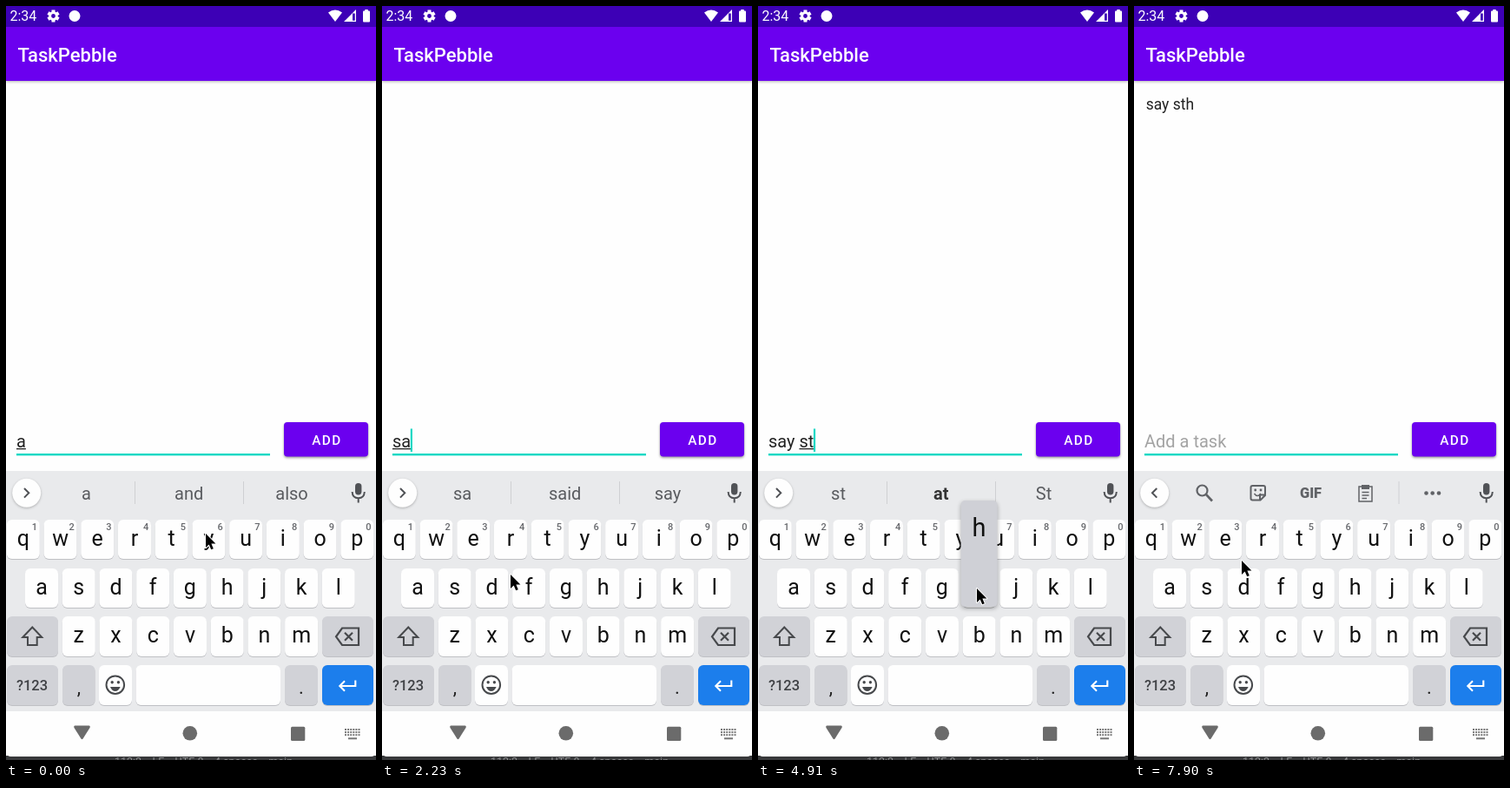
Write an HTML page with a canvas that moves like this. It is 426 px wide and 866 px high and loops after 8 s.

```html
<!DOCTYPE html>
<html lang="en">
<head>
<meta charset="utf-8">
<title>To-do list</title>
<style>
  html, body { margin: 0; width: 100%; height: 100%; overflow: hidden; background: #fefefe; }
  canvas { display: block; }
</style>
</head>
<body>
<canvas id="stage" width="426" height="866"></canvas>
<script>
const ctx = document.getElementById('stage').getContext('2d');
const LOOP = 8000, TICK = 148.9;
const FONT = 'Roboto, sans-serif';
const PURPLE = '#6b00ef', TEAL = '#12d8c4', INK = '#222', GREY = '#606266';
const PITCH = 42.72;

// Pointer path: tick, x, y
const PATH = [
  [1, 230, 606], [4, 345, 692], [6, 412, 744], [7, 416, 723], [9, 338, 676],
  [11, 86, 672], [12, 66, 676], [13, 45, 674], [14, 80, 668], [15, 148, 653],
  [17, 234, 614], [18, 236, 630], [21, 228, 788], [22, 215, 778], [24, 110, 684],
  [25, 88, 678], [26, 96, 668], [29, 190, 604], [30, 192, 608], [31, 200, 612],
  [33, 252, 669], [34, 262, 674], [37, 412, 784], [39, 381, 545], [41, 369, 501],
  [45, 368, 503], [49, 190, 711], [50, 184, 708], [53, 124, 637]
];

// Edits: tick, field text, suggestions (the bold one starts with *)
const EDITS = [
  [-4, 'a', 'a and also'],
  [7, '', ''],
  [12, 's', 's so she'],
  [14, 'sa', 'sa said say'],
  [18, 'say', 'say says saying'],
  [22, 'say ', 'that it something'],
  [26, 'say s', 's something so'],
  [31, 'say st', 'st *at St'],
  [34, 'say sth', 'sth stuff Stu'],
  [45, '', ''],
  [47, '', '']
];
const ADDED = 45;

// Key presses: tick, key
const PRESSES = [[6, 'back'], [11, 's'], [13, 'a'], [17, 'y'], [21, 'space'], [25, 's'], [30, 't'], [33, 'h']];

const keys = [];
function addRow(letters, x, y, h) {
  [...letters].forEach((id, i) => keys.push({ id, x: x + i * PITCH, y, w: 38, h, letter: true }));
}
function addKey(id, x, y, w, fill) {
  keys.push({ id, x, y, w, h: 46, fill });
}
addRow('qwertyuiop', 0.8, 590, 45);
addRow('asdfghjkl', 22, 646, 45);
addRow('zxcvbnm', 64.8, 701, 46);
addKey('shift', 1, 701, 59, '#d1d2d7');
addKey('back', 364, 701, 59, '#d1d2d7');
addKey('?123', 1, 757, 59, '#d1d2d7');
addKey(',', 65, 757, 37.5, '#d1d2d7');
addKey('emoji', 107, 757, 38, '#fefefe');
addKey('space', 149.5, 757, 166.5, '#fefefe');
addKey('.', 321, 757, 38, '#d1d2d7');
addKey('enter', 364, 757, 59, '#1c7eec');

function rect(x, y, w, h, fill) {
  ctx.fillStyle = fill;
  ctx.fillRect(x, y, w, h);
}
function round(x, y, w, h, r, fill) {
  ctx.beginPath();
  ctx.roundRect(x, y, w, h, r);
  ctx.fillStyle = fill;
  ctx.fill();
}
function disc(x, y, r, fill) {
  ctx.beginPath();
  ctx.arc(x, y, r, 0, 7);
  ctx.fillStyle = fill;
  ctx.fill();
}
function text(s, x, y, size, fill, align = 'left', weight = 400) {
  ctx.font = `${weight} ${size}px ${FONT}`;
  ctx.textAlign = align;
  ctx.fillStyle = fill;
  ctx.fillText(s, x, y);
}
function at(x, y, draw) {
  ctx.save();
  ctx.translate(x, y);
  draw();
  ctx.restore();
}
function shadow(blur, dy, alpha, draw) {
  ctx.save();
  ctx.shadowColor = `rgba(0,0,0,${alpha})`;
  ctx.shadowBlur = blur;
  ctx.shadowOffsetY = dy;
  draw();
  ctx.restore();
}
function fillPath(d, fill) {
  ctx.fillStyle = fill;
  ctx.fill(new Path2D(d));
}
function strokePath(d, color, width) {
  ctx.strokeStyle = color;
  ctx.lineWidth = width;
  ctx.stroke(new Path2D(d));
}

function statusBar() {
  rect(0, 0, 426, 24, '#3d00b6');
  text('2:34', 4.5, 17, 16, '#fff');
  at(54.5, 11.5, () => {
    for (let i = 0; i < 6; i++) {
      ctx.rotate(Math.PI / 3);
      rect(-2, -7, 4, 5, '#fff');
    }
    disc(0, 0, 5.2, '#fff');
    disc(0, 0, 2.4, '#3d00b6');
  });
  disc(79, 11.5, 6.5, '#fff');
  fillPath('M371 7.5Q379 1.5 387 7.5L379 18Z', '#fff');
  fillPath('M389 18L403 4V8.5H399V18Z', '#fff');
  strokePath('M399 17.3H402.4V5.5', '#fff', 1.2);
  round(411, 5.5, 8, 13, 1, '#fff');
  rect(413.3, 4, 3.4, 2, '#fff');
}

function appBar() {
  shadow(3, 1, 0.3, () => rect(0, 24, 426, 62, PURPLE));
  statusBar();
  text('TaskPebble', 13.5, 64, 22, '#fff', 'left', 500);
}

function addButton(tick) {
  shadow(3, 1.5, 0.4, () => round(320, 478, 97, 39.5, 4, PURPLE));
  const age = tick - 43;
  if (age >= 0 && age < 5) {
    ctx.save();
    ctx.beginPath();
    ctx.roundRect(320, 478, 97, 39.5, 4);
    ctx.clip();
    disc(369, 500, 24 + age * 18, `rgba(255,255,255,${0.24 - age * 0.04})`);
    ctx.restore();
  }
  ctx.letterSpacing = '1.4px';
  text('ADD', 369.4, 503.7, 15.3, '#fff', 'center', 500);
  ctx.letterSpacing = '0px';
}

function inputField(tick, [since, value]) {
  const base = 506.5;
  rect(12, 514, 292, 2.4, TEAL);
  if (value) text(value, 12, base, 20, INK);
  else text('Add a task', 12, base, 20, '#a3a3a3');
  const width = s => ctx.measureText(s).width;
  const start = value.lastIndexOf(' ') + 1;
  const end = 12 + width(value);
  const from = 12 + width(value.slice(0, start));
  if (end > from) rect(from, 508, end - from, 1.3, INK);
  if ((tick - since) * TICK % 1000 < 500) rect(end - 0.4, 485.5, 2.2, 26.5, TEAL);
}

function mic() {
  round(402, 548, 7.4, 13.5, 3.7, '#505256');
  strokePath('M398.6 558Q399 565.2 405.7 565.2Q412.4 565.2 412.8 558M405.7 565V570.5', '#505256', 2);
}

function toolbar() {
  ctx.beginPath();
  ctx.arc(78.5, 556.5, 6, 0, 7);
  ctx.strokeStyle = GREY;
  ctx.lineWidth = 2.2;
  ctx.stroke();
  strokePath('M83 561L90 568.5', GREY, 2.6);

  strokePath('M136.5 551H149Q151 551 151 553V562L145.5 567.5H136.5Q134.5 567.5 134.5 565.5V553Q134.5 551 136.5 551ZM151 561.5H145V567.5', GREY, 2);
  strokePath('M138.5 560Q142 565 146 560', GREY, 1.5);
  disc(139.7, 556, 1.4, GREY);
  disc(146, 556, 1.4, GREY);

  text('GIF', 203.5, 564.7, 16.4, GREY, 'center', 900);

  ctx.strokeRect(259, 552, 15, 17);
  rect(262, 550, 9, 5, GREY);
  strokePath('M262.5 558.5H270.5M262.5 562H270.5M262.5 565.5H268', GREY, 1.6);

  rect(304.5, 546, 1, 26, '#cfd0d3');
  for (const x of [336.5, 343.7, 351]) disc(x, 559.5, 2.3, GREY);
}

function strip(words) {
  shadow(3, 1, 0.25, () => disc(23.7, 559.3, 16.5, '#fefefe'));
  if (words) {
    strokePath('M21 554L26.3 559.3L21 564.6', '#505256', 2);
    rect(148, 546, 1, 26, '#cfd0d3');
    rect(273, 546, 1, 26, '#cfd0d3');
    words.split(' ').forEach((word, i) => {
      const bold = word[0] === '*';
      text(bold ? word.slice(1) : word, [92.5, 210.7, 329][i], 567,
        20, bold ? '#333' : '#595b5f', 'center', bold ? 700 : 400);
    });
  } else {
    strokePath('M26.3 554L21 559.3L26.3 564.6', '#505256', 2);
    toolbar();
  }
  mic();
}

const icons = {
  shift() {
    strokePath('M30.3 713.5L41.3 725H35.7V734H25V725H19.3Z', '#47494c', 2);
  },
  back() {
    strokePath('M387 714.5H406V734H387L380 724.3Z', '#47494c', 2.2);
    strokePath('M390 719.8L399 728.8M399 719.8L390 728.8', '#47494c', 2.2);
  },
  '?123'() { text('?123', 30, 786, 16.5, '#404246', 'center', 500); },
  ','() { text(',', 83.8, 790, 22, '#222', 'center'); },
  '.'() { text('.', 340, 790, 22, '#222', 'center'); },
  emoji() {
    ctx.beginPath();
    ctx.arc(125.8, 779.7, 10.3, 0, 7);
    ctx.strokeStyle = '#47494c';
    ctx.lineWidth = 2;
    ctx.stroke();
    disc(122.2, 776.7, 1.7, '#47494c');
    disc(129.4, 776.7, 1.7, '#47494c');
    fillPath('M120 782H131.6Q129.5 787 125.8 787Q122 787 120 782Z', '#47494c');
  },
  enter() {
    strokePath('M402.3 774.5V781H385M390 775.3L384.3 781L390 786.7', '#fff', 2.1);
  }
};

function drawKey(key, held, i) {
  const { id, x, y, w, h } = key;
  round(x, y + 1, w, h, 6, '#bfc0c4');
  round(x, y, w, h, 6, key.fill || '#fefefe');
  if (held && !key.letter) round(x, y, w, h, 6, 'rgba(0,0,0,.1)');
  if (key.letter) {
    text(id, x + w / 2, y + 30.2, 25, '#111', 'center');
    if (i < 10) text((i + 1) % 10, x + w / 2 + 13.2, 602.3, 11, '#66686c', 'center', 500);
  } else if (icons[id]) {
    icons[id]();
  }
}

function popup({ id, x, y, w, h }) {
  shadow(5, 2, 0.3, () => round(x - 2, y - 78, w + 4, h + 77, 5, '#cfd0d6'));
  text(id, x + w / 2, y - 37, 29, '#111', 'center');
}

function keyboard(tick, words) {
  rect(0, 534, 426, 276, '#e9eaec');
  strip(words);
  const press = PRESSES.find(p => p[0] === tick);
  const heldId = press && press[1];
  keys.forEach((key, i) => drawKey(key, key.id === heldId, i));
  const held = keys.find(key => key.id === heldId);
  if (held && held.letter) popup(held);
}

function navBar() {
  rect(0, 861, 426, 5, '#38393b');
  ctx.save();
  ctx.beginPath();
  ctx.rect(0, 862, 426, 4);
  ctx.clip();
  text('112:2    LF    UTF-8    4 spaces    main', 125, 872, 12.5, '#8b8c8e');
  ctx.restore();
  round(0, 810, 426, 52, [0, 0, 5, 5], '#fefefe');
  fillPath('M79.5 826.5H95.5Q97.5 827 96.5 829L88.6 841.5Q87.5 842.8 86.4 841.5L78.5 829Q77.5 827 79.5 826.5Z', '#6b6b6b');
  disc(211.8, 835.3, 8.3, '#6b6b6b');
  round(328, 827.7, 16.3, 16.3, 1.5, '#6b6b6b');
  for (let row = 0; row < 3; row++)
    for (let i = 0; i < 6; i++) rect(390 + i * 3.1, 830 + row * 3.1, 2, 2, '#777');
  rect(394, 840.3, 10, 2, '#777');
}

function pointer(tick) {
  let i = PATH.findIndex(p => p[0] > tick);
  if (i < 0) i = PATH.length - 1;
  const b = PATH[i], a = PATH[Math.max(0, i - 1)];
  const f = a === b ? 0 : Math.min(1, (tick - a[0]) / (b[0] - a[0]));
  at(a[1] + (b[1] - a[1]) * f, a[2] + (b[2] - a[2]) * f, () => {
    const arrow = 'M0 0V16L3.7 12.6L6.2 18.3L8.8 17.2L6.4 11.6H11.4Z';
    ctx.lineJoin = 'round';
    strokePath(arrow, '#fff', 2);
    fillPath(arrow, '#000');
    ctx.lineJoin = 'miter';
  });
}

function draw(ms) {
  // The screen refreshes in hard steps.
  const tick = Math.min(53, Math.floor((ms + 9) / TICK));
  const edit = EDITS.filter(e => e[0] <= tick).pop();
  rect(0, 0, 426, 866, '#fefefe');
  appBar();
  if (tick >= ADDED) text('say sth', 13.7, 119, 17.5, INK);
  inputField(tick, edit);
  addButton(tick);
  keyboard(tick, edit[2]);
  navBar();
  pointer(tick);
}

const begin = performance.now();
function frame() {
  draw((performance.now() - begin) % LOOP);
  requestAnimationFrame(frame);
}
frame();
</script>
</body>
</html>
```
